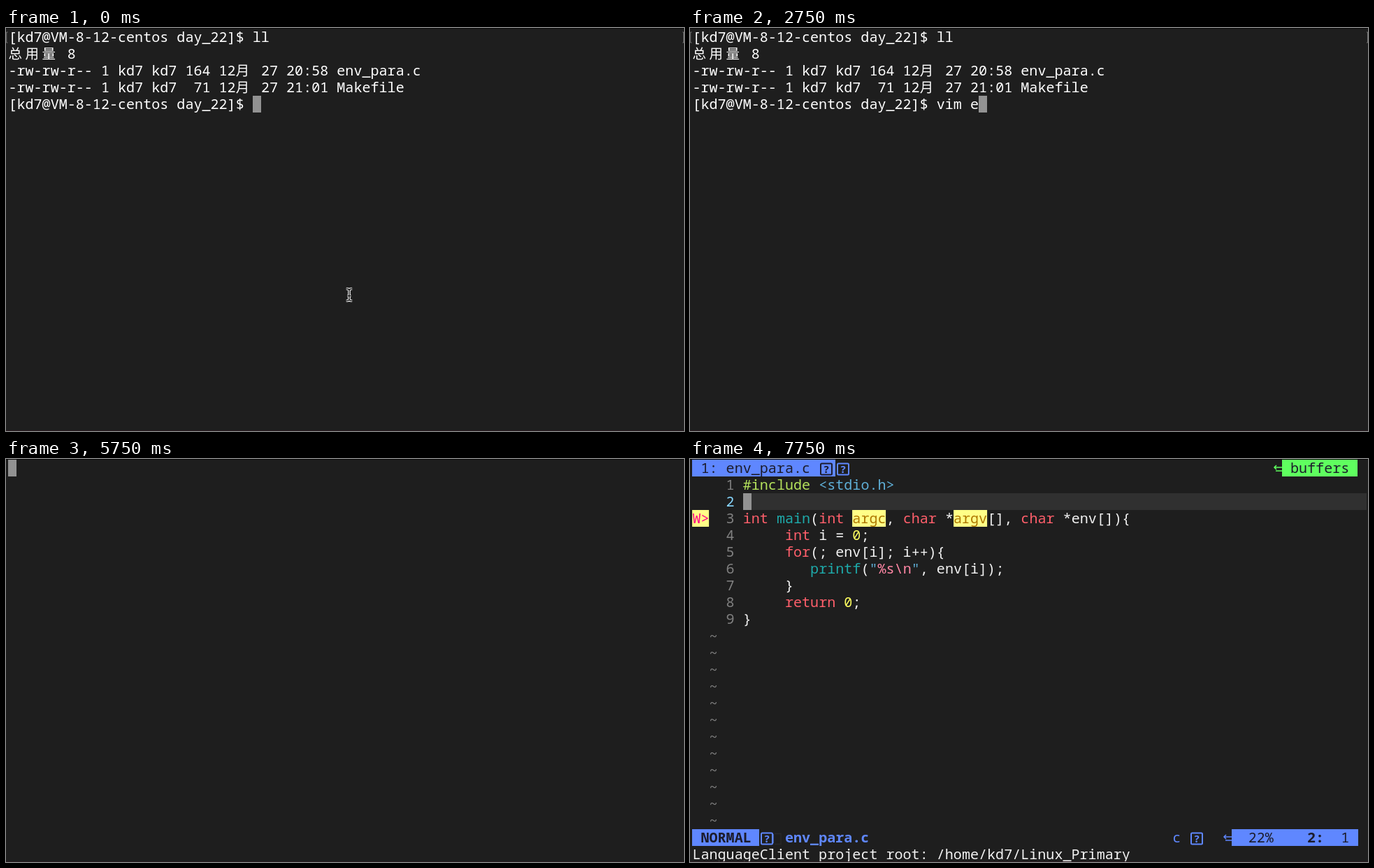
Recreate the animation shown at these times as an HTML page. Size 970 by 577 pixels, loop 8000 ms.

```html
<!DOCTYPE html>
<html lang="zh">
<head>
<meta charset="utf-8">
<title>Terminal</title>
<style>
  html, body { margin: 0; width: 100%; height: 100%; overflow: hidden; background: #1e1e1e; }
  svg { display: block; width: 970px; height: 577px; }
  text {
    font: 500 20.08px "Noto Sans Mono", "DejaVu Sans Mono", monospace;
    font-variant-ligatures: none;
    white-space: pre;
  }
  text.cjk { font: 500 19.5px "Noto Sans CJK SC", "Noto Sans CJK", sans-serif; }
  text.bold { font-weight: 700; }
  text.icon { font: 800 15px "Noto Sans Mono", "DejaVu Sans Mono", monospace; }
</style>
</head>
<body>
<svg id="stage" viewBox="0 0 970 577"></svg>
<script>
const NS = 'http://www.w3.org/2000/svg';
const LOOP = 8000, CW = 12.05, CH = 24.05, X0 = 3.4, Y0 = 1;
const BG = '#1e1e1e', WHITE = '#ffffff', PLAIN = '#f2f2f2', GRAY = '#808080', CURSOR = '#929292';
const BLUE = '#5f87ff', GREEN = '#5fff5f', DARK = '#1c1c2c', RED = '#ff5f6b', TEAL = '#1eaaaa';
const SKY = '#5fafd7', LIME = '#b4e25c', YELLOW = '#ffff5f', PINK = '#ff87a5', PALE = '#ffff87';

const stage = document.getElementById('stage');
const colX = c => X0 + c * CW;
const rowY = r => Y0 + r * CH;

function el(parent, tag, attrs) {
  const node = document.createElementNS(NS, tag);
  for (const k in attrs) node.setAttribute(k, attrs[k]);
  parent.appendChild(node);
  return node;
}
const group = (parent = stage) => el(parent, 'g', {});

function put(parent, row, col, str, fill = WHITE, cls = '') {
  const node = el(parent, 'text', { x: colX(col), y: rowY(row) + 19, fill, class: cls });
  node.textContent = str;
  return node;
}
// Alternating text and colour, laid out from one column.
function run(parent, row, col, ...parts) {
  for (let i = 0; i < parts.length; i += 2) {
    put(parent, row, col, parts[i], parts[i + 1]);
    col += parts[i].length;
  }
}
function block(parent, row, col, cols, fill) {
  return el(parent, 'rect', {
    x: Math.round(colX(col)), y: Math.round(rowY(row)),
    width: Math.round(cols * CW), height: 24, fill
  });
}
function line(parent, d, stroke, width = 1.5) {
  return el(parent, 'path', { d, stroke, 'stroke-width': width, fill: 'none' });
}
function icon(parent, row, x, color) {
  const y = Math.round(rowY(row));
  el(parent, 'rect', { x: x + 1, y: y + 5.5, width: 16, height: 16, rx: 1.5, fill: 'none', stroke: color, 'stroke-width': 2 });
  el(parent, 'text', { x: x + 4.5, y: y + 19, fill: color, class: 'icon' }).textContent = '?';
}
function arrow(parent, row, x, color) {
  const y = Math.round(rowY(row)) + 13;
  line(parent, `M${x + 12} ${y - 2}H${x + 1}M${x + 4} ${y - 5}L${x + 1} ${y - 2}L${x + 4} ${y + 1}M${x + 3} ${y + 3}H${x + 12}`, color);
}
function marks(parent, row) {
  const y = rowY(row) + 5;
  line(parent, `M2.5 ${y}H.7V${y + 15}H2.5M968 ${y}H969.5V${y + 15}H968`, '#777', 1);
}

el(stage, 'rect', { width: 970, height: 577, fill: BG });

// Shell
const PROMPT = '[kd7@VM-8-12-centos day_22]$ ';
const shell = group();
marks(shell, 0);
put(shell, 0, 0, PROMPT + 'll');
[...'总用量'].forEach((ch, i) => put(shell, 1, i * 2, ch, WHITE, 'cjk'));
put(shell, 1, 7, '8');
[['164', '20:58', 'env_para.c'], [' 71', '21:01', 'Makefile']].forEach(([size, time, name], i) => {
  const row = i + 2;
  put(shell, row, 0, `-rw-rw-r-- 1 kd7 kd7 ${size} 12`);
  put(shell, row, 27, '月', WHITE, 'cjk');
  put(shell, row, 30, `27 ${time} ${name}`);
});
const command = put(shell, 4, 0, PROMPT);
const entered = group(shell);
marks(entered, 4);

const pointer = group(shell);
const beam = 'M486.8 373.5H488.5Q491 373.5 491 376V388Q491 390.5 488.5 390.5H486.8M495.2 373.5H493.5Q491 373.5 491 376M491 388Q491 390.5 493.5 390.5H495.2M488.5 383.5H493.5';
line(pointer, beam, WHITE, 3.6);
line(pointer, beam, '#111', 1.3);

// Editor
const editor = group();
block(editor, 0, 0, 17, BLUE);
put(editor, 0, 1, '1: env_para.c', DARK);
icon(editor, 0, 186, DARK);
icon(editor, 0, 210, BLUE);
arrow(editor, 0, 835, GREEN);
block(editor, 0, 70, 9, GREEN);
put(editor, 0, 71, 'buffers', DARK);

el(editor, 'rect', { x: 52, y: 49, width: 916, height: 24, fill: '#303030' });
const gutter = el(editor, 'rect', { x: 52, y: 49, width: 24, height: 24, fill: BG });

const code = group(editor);
const hints = group(code);
block(hints, 3, -2, 2, PALE);
put(hints, 3, -2, 'W>', '#ff0087');
block(hints, 3, 17, 4, PALE);
block(hints, 3, 29, 4, PALE);

for (let n = 1; n <= 9; n++) put(code, n, 2, String(n), n === 2 ? '#87d7ff' : GRAY);
for (let r = 10; r <= 21; r++) put(code, r, 0, '~', GRAY);
run(code, 1, 4, '#include ', LIME, '<stdio.h>', SKY);
run(code, 3, 4, 'int ', RED, 'main', TEAL, '(', PLAIN, 'int ', RED);
const argc = put(code, 3, 17, 'argc', PLAIN);
run(code, 3, 21, ', ', PLAIN, 'char ', RED, '*', PLAIN);
const argv = put(code, 3, 29, 'argv', PLAIN);
run(code, 3, 33, '[], ', PLAIN, 'char ', RED, '*env[]){', PLAIN);
run(code, 4, 9, 'int ', RED, 'i = ', PLAIN, '0', YELLOW, ';', PLAIN);
run(code, 5, 9, 'for', RED, '(; env[i]; i++){', PLAIN);
run(code, 6, 12, 'printf', TEAL, '(', PLAIN, '"', SKY, '%s\\n', PINK, '"', SKY, ', env[i]);', PLAIN);
put(code, 7, 9, '}', PLAIN);
run(code, 8, 9, 'return ', RED, '0', YELLOW, ';', PLAIN);
put(code, 9, 4, '}', PLAIN);

block(editor, 22, 0, 8, BLUE);
put(editor, 22, 1, 'NORMAL', DARK, 'bold');
icon(editor, 22, 101, BLUE);
line(editor, 'M118.8 537V550', BLUE, 1.5);
line(editor, 'M121 536.5H130V551.5H121', '#292929', 1.5);
put(editor, 22, 11, 'env_para.c', BLUE, 'bold');
put(editor, 22, 57, 'c', BLUE);
icon(editor, 22, 716, BLUE);
arrow(editor, 22, 763, BLUE);
block(editor, 22, 64, 15, BLUE);
put(editor, 22, 66, '22%', DARK);
put(editor, 22, 73, '2:', DARK, 'bold');
put(editor, 22, 77, '1', DARK);
const message = put(editor, 23, 0, 'LanguageClient project root: /home/kd7/Linux_Primary', PLAIN);

const cursor = block(stage, 0, 0, 1, CURSOR);
el(stage, 'rect', { width: 970, height: 1, fill: '#080808' });
el(stage, 'rect', { y: 576, width: 970, height: 1, fill: '#2a1b21' });

// Time and the command typed so far
const TYPED = [
  [0, ''], [250, 'v'], [500, 'vi'], [750, 'vim'], [1000, 'vim '], [1250, 'vim p'], [1500, 'vim pr'],
  [1750, 'vim p'], [2000, 'vim '], [2750, 'vim e'], [3250, 'vim en'], [3500, 'vim env'], [3750, 'vim env_para.c ']
];
const HIDE = 250, ENTER = 4250, CLEAR = 5500, OPEN = 6000, ROOT = 6250, LINT = 7000;

const show = (node, on) => { node.style.display = on ? '' : 'none'; };

function draw(t) {
  const typed = TYPED.filter(s => s[0] <= t).pop()[1];
  const open = t >= OPEN, lint = t >= LINT;
  const shift = lint ? 2 : 0;

  show(shell, t < CLEAR);
  show(pointer, t < HIDE);
  show(entered, t >= ENTER);
  command.textContent = PROMPT + typed;

  show(editor, open);
  show(message, t >= ROOT);
  show(hints, lint);
  show(gutter, lint);
  code.setAttribute('transform', `translate(${shift * CW} 0)`);
  for (const arg of [argc, argv]) arg.setAttribute('fill', lint ? '#af7800' : PLAIN);

  let row = 0, col = 0;
  if (t < CLEAR) { row = 4; col = PROMPT.length + typed.length; }
  else if (open) { row = 2; col = 4 + shift; }
  cursor.setAttribute('x', Math.round(colX(col)));
  cursor.setAttribute('y', Math.round(rowY(row)));
}

const start = performance.now();
function tick() {
  draw((performance.now() - start) % LOOP);
  requestAnimationFrame(tick);
}
draw(0);
requestAnimationFrame(tick);
</script>
</body>
</html>
```
